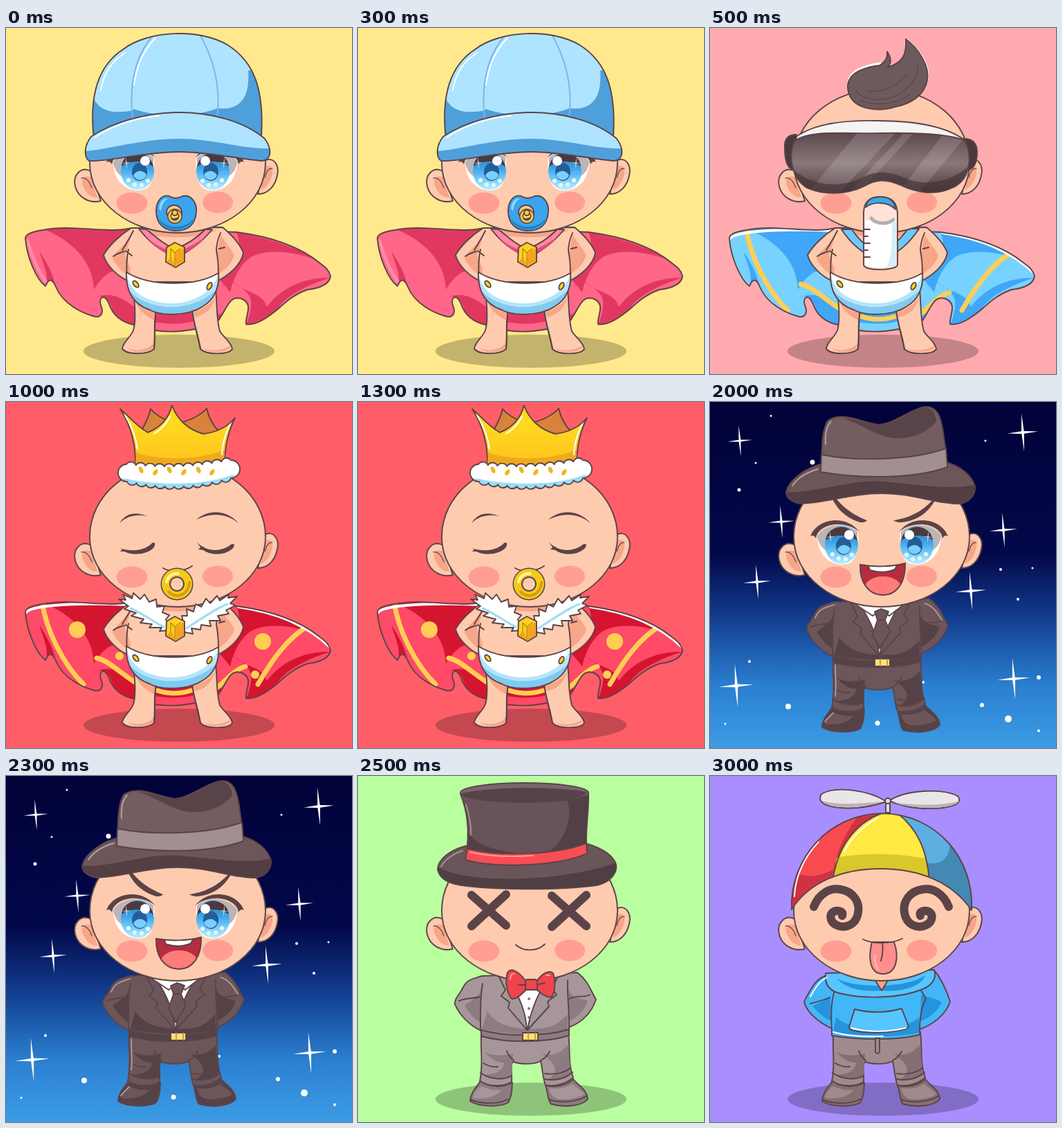
An HTML page for the animation above (3.5 s loop, 500 by 500 pixels).

```html
<!DOCTYPE html>
<html lang="en">
<head>
<meta charset="utf-8">
<title>Baby costumes</title>
<style>
html, body { margin: 0; width: 100%; height: 100%; overflow: hidden; }
svg { display: block; width: 100vw; height: 100vh; stroke-linejoin: round; stroke-linecap: round; }
</style>
</head>
<body>
<svg id="stage" viewBox="0 0 500 500"></svg>
<script>
const stage = document.getElementById("stage");
const ink = "#5b4348", skin = "#ffcbaf", shade = "#f7a688", white = "#fff", gold = "#ffd21f";
const cape = "var(--cape)", fold = "var(--fold)", suit = "var(--suit)", dim = "var(--dim)";
const hold = 500;
const scenes = [
  { bg: "#ffe98c", cape: "#ff6688", fold: "#e13861" },
  { bg: "#ffaaaf", cape: "#78d2ff", fold: "#40a6f7" },
  { bg: "#ff5e68", cape: "#ff4a68", fold: "#d5152f" },
  { bg: "#99e0ff", cape: "#ff4a68", fold: "#d5152f" },
  { bg: "#010238", suit: "#6d565a", dim: "#554247" },
  { bg: "#b9ff9f", suit: "#a6969a", dim: "#8c7b81" },
  { bg: "#a98eff", suit: "#a18a8c", dim: "#876e72" }
];

// Drawing helpers; each returns SVG markup.
const flat = (fill, d, more = "") => `<path fill="${fill}" d="${d}" ${more}/>`;
const line = (d, color = ink, w = 1.9) => flat("none", d, `stroke="${color}" stroke-width="${w}"`);
const shape = (fill, d) => flat(fill, d, `stroke="${ink}" stroke-width="1.9"`);
const oval = (fill, x, y, rx, ry = rx, more = "") => `<ellipse fill="${fill}" cx="${x}" cy="${y}" rx="${rx}" ry="${ry}" ${more}/>`;
const rim = `stroke="${ink}" stroke-width="1.9"`;
const ring = (x, y, r, color, w) => oval("none", x, y, r, r, `stroke="${color}" stroke-width="${w}"`);
const on = (list, ...kids) => `<g data-on="${list}">${kids.join("")}</g>`;
const place = (how, ...kids) => `<g transform="${how}">${kids.join("")}</g>`;
const pair = (sum, art) => art + place(`matrix(-1 0 0 1 ${sum} 0)`, art);
const fade = (id, ...stops) => `<linearGradient id="${id}" x2="0" y2="1">${stops.map(([o, c]) => `<stop offset="${o}" stop-color="${c}"/>`).join("")}</linearGradient>`;
let clips = 0;
function inside(fill, d, ...kids) {
  const id = "clip" + clips++;
  return `<clipPath id="${id}"><path d="${d}"/></clipPath>` + flat(fill, d) +
    `<g clip-path="url(#${id})">${kids.join("")}</g>` + shape("none", d);
}

function sparkle([x, y, r]) {
  const k = r * 0.08, h = r * 1.25;
  return place(`translate(${x} ${y}) rotate(-4)`, flat(white, `M0 ${-h}L${k} ${-k}L${r} 0L${k} ${k}L0 ${h}L${-k} ${k}L${-r} 0L${-k} ${-k}Z`));
}

function sky() {
  const big = [[43, 56, 18], [452, 44, 22], [103, 173, 19], [68, 260, 20], [424, 185, 20], [377, 273, 22], [38, 410, 25], [439, 400, 24]];
  const dots = [[148, 87, 3.5], [42, 127, 2.5], [431, 458, 5], [113, 440, 4], [242, 464, 3.5], [57, 375, 2], [308, 405, 2], [393, 438, 3], [420, 242, 2], [466, 240, 1.5], [475, 398, 3], [88, 20, 1.5], [398, 56, 1.5], [66, 88, 1.5], [445, 285, 2], [22, 465, 1.5], [475, 475, 2]];
  return big.map(sparkle).join("") + dots.map(s => oval(white, ...s)).join("");
}

// Round bumps along the top edge, then back along the bottom.
function furBand() {
  const n = 11, top = [], low = [];
  for (let i = 0; i <= n; i++) {
    const u = i / n, sag = Math.sin(Math.PI * u) * 6;
    top.push([174 + 151 * u, 90 - 6 * u + sag]);
    low.unshift([175 + 150 * u, 115 - 5 * u + sag * 1.6]);
  }
  const pts = [...top, ...low, top[0]];
  const spots = [196, 217, 237, 258, 279, 299].map((x, i) =>
    oval("#f5b61e", x, i % 2 ? 102 : 98, 3, 5, `transform="rotate(${i % 2 ? 35 : -25} ${x} 100)"`));
  return inside(white, "M" + pts[0] + pts.slice(1).map(p => "A8 8 0 0 1 " + p).join("") + "Z",
    line("M172 118C207 127 282 130 328 113", "#9adcf8", 15)) + spots.join("");
}

const eye = [
  flat(white, "M155 195C156 220 172 235 191 235C208 235 216 222 214 186C195 172 167 177 155 195Z"),
  flat("#b9b5b8", "M155 194C165 177 195 172 213 187V197C195 184 176 187 168 215C160 210 156 202 155 194Z"),
  oval("url(#iris)", 190, 207, 24, 27),
  flat("#4b393f", "M167 200C169 175 209 174 213 201C204 191 178 190 167 200Z"),
  oval("#255d96", 193, 208, 11, 13),
  flat("#7bd0ff", "M184 213C190 203 200 207 203 212C200 222 188 222 184 213Z"),
  oval(white, 201, 192, 7), sparkle([174, 195, 7]),
  oval("#e5fbff", 177, 220, 3), oval("#e5fbff", 186, 226, 3), oval("#e5fbff", 196, 227, 3), oval("#e5fbff", 205, 221, 3),
  flat(ink, "M145 194C155 167 198 162 216 188C203 176 177 172 161 184C155 189 154 192 153 197C151 193 148 192 145 194Z")
].join("");

const backdrop = [
  `<defs>${fade("night", [0, "#010238"], [.44, "#03084a"], [.62, "#123c8d"], [.82, "#2b7fd0"], [1, "#3c9ce6"])}
  ${fade("iris", [0, "#286fae"], [.45, "#3fa9ee"], [1, "#b9f0ff"])}
  ${fade("lens", [0, "#5c494c"], [.5, "#89777a"], [1, "#4c383c"])}
  ${fade("crown", [.3, "#ffd91f"], [1, "#ffc21d"])}</defs>`,
  flat("var(--bg)", "M0 0H500V500H0Z"),
  on("3",
    flat(white, "M0 38C12 40 14 22 38 22C62 22 76 36 74 57C95 48 118 60 118 84C135 84 150 92 158 103L200 130C140 143 60 148 0 142Z"),
    flat(white, "M500 8C478 10 467 24 464 27C445 20 430 32 425 53C405 48 366 44 359 70C355 84 364 90 374 92L310 100C370 108 440 104 500 101Z"),
    flat(white, "M30 232C55 224 78 225 92 219C78 202 92 188 113 193C128 150 210 150 240 170C320 130 385 130 412 168C425 180 420 196 417 203C438 203 448 218 446 231C466 231 482 245 481 260C492 261 497 264 500 268V284C380 270 150 230 30 232Z"),
    flat(white, "M0 332C8 318 26 312 42 318C90 280 165 290 200 310C280 275 345 290 380 322C430 300 475 300 500 303V392C430 410 390 402 345 414C220 424 90 428 0 421Z")),
  on("4", flat("url(#night)", "M0 0H500V500H0Z"), sky()),
  on("012356", oval("#000", 250, 467, 138, 24, 'opacity=".23"'))
];

const bareBody = on("0123",
  inside(cape, "M182 289C145 298 97 283 53 292C39 294 28 298 28 304C30 331 44 364 57 373C62 361 67 362 72 374C82 399 110 412 128 417C137 419 141 412 138 403C132 392 141 380 149 399C154 414 166 425 185 429C211 440 270 440 306 424C320 405 322 386 340 391C359 399 345 416 347 428C362 430 377 419 392 407C404 396 416 385 436 378C453 376 467 371 469 359C467 350 462 346 454 340C420 312 372 300 333 295Z",
    flat(fold, "M58 292C97 285 130 298 180 290L184 362C165 345 147 345 127 378C126 344 105 313 58 292ZM48 322C56 348 61 353 58 374H72C67 352 58 338 48 322ZM126 391C145 381 153 398 156 418L190 440H300L312 412C290 424 205 420 184 402C165 388 147 380 126 391Z"),
    flat(fold, "M306 360C329 347 345 327 333 295C380 304 426 319 446 334C405 320 373 321 354 331C338 342 328 362 324 382ZM324 364C350 382 364 386 347 430C375 424 385 413 393 405C402 391 425 375 468 361C430 360 397 376 377 403C370 381 348 385 324 364Z"),
    on("123",
      line("M52 288C58 330 82 378 112 408M131 370C149 374 164 391 188 406M212 417C230 421 252 421 270 417M299 417C318 406 324 389 346 382M364 408C383 375 408 338 440 322", "#ffce55", 7),
      line("M29 304C35 296 80 289 180 293M336 296C400 305 440 327 468 354", white, 4)),
    on("23", ...[[103, 329, 12], [371, 346, 12], [164, 367, 6], [360, 394, 6]].map(c => oval("#ffce55", ...c))),
    on("0", line("M31 308C40 336 46 350 57 366", "#ff8ba7", 5))),
  shape(skin, "M184 380C187 405 188 424 184 437C180 447 169 454 168 463C172 472 203 473 214 464C216 444 213 427 217 406L269 406C270 424 276 440 281 464C289 472 321 473 327 464C326 454 314 447 309 438C304 422 305 397 303 378Z"),
  flat(cape, "M218 411H268L273 434C250 440 234 440 215 436Z"),
  flat(fold, "M218 411H268L271 424C250 429 233 428 216 425Z"),
  on("123", line("M219 417C234 422 252 422 267 417", "#ffce55", 7)),
  line("M217 408C214 425 216 444 214 464M269 408C270 424 278 443 281 464M215 437C235 440 253 439 274 435"),
  flat(shade, "M186 391C195 402 204 407 215 408L214 422C201 416 190 407 186 391ZM271 408C285 406 296 399 302 389C299 406 286 416 272 418ZM176 463C190 468 204 465 213 456V463C202 470 183 470 176 463ZM284 463C299 468 313 466 324 459C326 468 297 472 284 463Z"),
  shape(skin, "M181 289C165 299 149 314 141 328C144 342 161 360 180 367H303C323 357 340 342 343 325C338 311 326 299 313 288Z"),
  flat(shade, "M181 301C170 314 158 324 154 334C162 347 171 355 179 359L180 347L172 328ZM311 298C315 310 327 319 330 329C324 344 315 350 307 356L305 323ZM191 292H305C282 306 210 306 191 292Z"),
  line("M184 293C178 305 173 313 168 321M177 320C174 333 174 348 175 360M173 322L182 329M310 296C307 303 304 311 304 322C307 335 307 347 307 358M308 319L316 317M155 330C160 326 166 324 171 323"),
  inside(white, "M174 353C208 374 275 374 307 354C309 376 300 394 283 403C263 416 225 417 207 407C184 399 173 380 174 353Z",
    flat("#b4e5fb", "M175 358C181 386 211 398 240 398C269 398 297 383 306 358L310 420H172Z"),
    flat("#82caf0", "M178 380C210 411 267 411 302 380L300 420H180Z")),
  oval(gold, 187.5, 370, 3, 5.5, rim + ' transform="rotate(-40 187.5 370)"'),
  oval(gold, 294, 373, 3, 5.5, rim + ' transform="rotate(28 294 373)"'));

const neckwear = [
  on("0",
    shape("#ff86a2", "M192 290L203 291C218 303 230 314 245 319C262 313 276 303 288 291H298C285 307 269 321 246 332C222 321 206 309 192 290Z"),
    flat("#e34d76", "M201 301C217 315 229 320 244 322V330C222 322 211 312 201 301ZM288 302C277 315 264 323 249 329V323C264 317 277 310 288 302Z")),
  on("1", shape("#6dcaff", "M190 291H205C217 309 231 320 245 323C263 317 276 305 286 290H302C289 310 271 327 246 336C220 327 203 311 190 291Z"))
];

const dressed = [
  on("456",
    shape(suit, "M178 372C177 398 181 419 176 441C190 450 211 449 222 442C223 428 219 418 224 413C236 417 254 417 264 412C267 425 267 437 271 447C285 449 300 445 311 436C303 415 307 393 304 370Z"),
    flat(dim, "M183 398C197 407 214 403 224 401L222 435C212 440 196 440 180 432C202 432 211 423 211 414C201 415 190 408 183 398ZM266 402C285 405 294 399 303 389L308 431C299 439 286 441 272 440C290 430 290 418 266 402Z"),
    line("M177 429C192 439 210 440 222 433M181 415C190 420 197 421 202 420M270 438C286 441 300 437 310 428M270 430C285 432 298 429 307 422M225 411C219 406 216 401 215 397M264 411C272 407 275 402 277 398"),
    shape(dim, "M177 441C170 451 162 459 162 470C174 478 205 479 217 472C224 460 222 451 223 443C208 451 190 450 177 441Z"),
    shape(dim, "M271 447C275 459 274 469 279 474C296 479 323 478 332 467C331 453 318 447 311 438C303 446 286 451 271 447Z"),
    flat(suit, "M178 448C170 454 167 460 166 465C183 468 198 464 207 454C198 454 187 453 178 448ZM276 451C278 460 282 465 290 467C308 468 321 464 327 460C322 453 315 450 309 445C300 451 288 453 276 451Z"),
    line("M163 468C178 474 202 475 217 467M277 468C293 473 318 471 331 462")),
  on("45",
    shape(suit, "M179 289C164 294 158 293 151 307C147 316 139 321 140 330C147 345 160 360 178 368V376C215 385 270 384 305 374V363C324 356 337 343 344 323C337 312 333 296 317 284Z"),
    flat(dim, "M178 307C176 320 161 325 154 332C162 345 169 351 178 357ZM304 308C309 322 326 322 332 325C326 341 317 348 305 354ZM187 340C201 362 228 367 264 365C281 364 292 356 303 344V366C270 375 219 375 179 366Z"),
    line("M180 300C176 322 177 348 177 368M303 295C302 319 306 345 305 365M146 325C158 320 167 322 176 319M305 322C317 316 326 321 335 316"),
    shape(white, "M208 287H286L245 366Z"),
    shape(suit, "M203 289L213 309L207 318L219 327L217 335L244 367C243 341 231 314 216 292Z"),
    shape(suit, "M290 288L280 307L287 316L274 326L276 333L245 367C249 341 260 314 276 290Z"),
    shape(dim, "M178 367C213 377 270 377 305 366V375C270 386 215 386 178 376Z"),
    shape("#ffe07a", "M238 371H260V382H238Z"), line("M246 372V381M256 372V381", "#c99b38")),
  on("4",
    shape(white, "M208 291L235 309L247 300L259 309L286 288Z"),
    shape(suit, "M238 303L247 299L258 303L253 315H242ZM242 315L235 336L245 356L260 332L253 315Z"),
    line("M180 293C161 298 156 302 152 312M310 291C322 294 329 305 335 315M181 380C181 395 183 410 181 425M166 462C170 456 175 453 178 449", "#b5a1a3", 1.6)),
  on("6",
    shape("#42b7f8", "M166 289C152 294 145 309 136 326C139 341 157 356 176 365V375C215 382 270 382 303 374V366C321 360 341 345 347 326C342 310 333 291 324 281Z"),
    flat("#2693df", "M174 318C163 326 155 328 149 333C159 345 166 350 175 354ZM305 316C317 321 328 321 335 327C326 344 316 349 304 355ZM182 349C213 372 270 373 302 349V371C270 378 216 378 178 371Z"),
    line("M180 310C174 330 175 350 176 367M304 308L312 322C305 334 303 350 303 368M145 329C156 326 164 324 173 320"),
    shape("#57c5ff", "M167 285C165 302 173 312 192 315C227 323 276 320 302 310C321 304 328 293 324 280Z"),
    flat("#2693df", "M184 293C210 307 285 307 311 288C306 305 274 313 247 310C221 313 194 306 184 293Z"),
    shape(shade, "M238 294L248 310L258 294Z"),
    shape("#57c5ff", "M209 337C232 343 256 342 277 336L287 362C285 366 279 367 272 368C250 372 228 372 207 368C201 366 200 363 202 359Z"),
    line("M204 364C228 371 260 370 283 364M169 291C157 297 151 308 145 319M178 370C200 376 225 377 250 376", white),
    shape(suit, "M239 379V399Q242 403 245 399V379Z"))
];

const head = [
  shape(skin, "M123 207C108 199 96 213 100 229C104 244 119 254 137 250ZM374 192C385 185 396 197 392 213C389 228 379 240 364 240Z"),
  flat(shade, "M123 216C112 211 107 220 112 230C117 241 124 245 132 245ZM374 201C382 195 388 204 384 214C381 224 376 231 368 234Z"),
  line("M109 217C115 215 121 222 124 231M385 203C379 202 376 208 374 216", ink, 1.2),
  shape(skin, "M121 195C121 135 177 88 248 88C319 88 375 135 375 195C375 252 317 296 248 296C179 296 121 252 121 195Z"),
  oval("#ff9f94", 182, 253, 22.5, 15.5), oval("#ff9f94", 306, 252, 22, 15.5)
];

const cross = line("M-25-22L25 22M25-23L-25 23", ink, 12);
const mouth = "M217 235C237 239 264 238 282 233C283 262 269 279 250 279C230 279 216 262 217 235Z";
const face = [
  on("034", pair(489, eye)),
  on("34", flat(ink, "M170 120C183 145 199 160 227 171C224 174 221 174 217 174C191 166 176 147 170 120ZM265 171C293 167 311 155 329 134C318 160 299 172 276 174C271 174 268 173 265 171Z")),
  on("2",
    flat(ink, "M164 175C173 160 188 158 204 165C188 162 176 164 164 175ZM275 170C293 154 320 156 336 175C319 161 297 159 275 170Z"),
    flat(ink, "M162 210C177 217 200 216 211 204C215 201 217 206 213 211C204 221 181 222 171 216H165L168 213ZM276 203C290 216 309 218 325 206C330 203 332 208 327 212C315 223 294 221 285 214L278 213L281 210Z")),
  on("5", place("translate(189 194)", cross), place("translate(305 195)", cross), line("M228 244C239 254 259 254 270 243")),
  on("6",
    pair(495, line("M150 189C158 169 174 161 189 164C207 167 217 182 214 198C211 215 196 221 184 216C172 211 171 197 182 195C188 194 193 197 191 202", ink, 12)),
    shape("#ff8e8d", "M234 240C228 264 231 286 250 286C269 286 274 263 266 240Z"),
    flat("#ffb0a8", "M237 258C235 271 239 280 246 282C241 275 239 268 240 257Z"),
    line("M249 241C251 252 249 260 247 267M221 236C235 243 262 243 278 235")),
  on("4", inside("#b52d3e", mouth, oval("#ff7d79", 250, 270, 27, 18), shape(white, "M228 234H271L267 242C255 247 241 246 231 243Z"))),
  on("0",
    shape("#39a5ef", "M217 264C217 250 226 240 236 243C242 247 249 246 255 243C266 240 276 251 275 265C274 285 262 293 246 293C228 293 217 283 217 264Z"),
    flat("#8bd5ff", "M221 261C222 250 228 245 234 247C228 250 225 255 224 265Z"),
    flat("#1f7fc9", "M221 276C233 291 259 291 272 275C266 295 228 297 221 276Z"),
    oval("#ffcf8a", 243, 266, 11, 10, rim), ring(244, 272, 8, ink, 6), ring(244, 272, 8, "#ffc93b", 3), oval(gold, 244, 267, 4, 4, rim)),
  on("23",
    line("M227 240C239 247 255 246 269 237"),
    ring(247, 263, 16.5, ink, 14), ring(247, 263, 16, "#f4c91c", 12),
    line("M232 260C234 251 242 247 249 248", "#fff3a0", 4), line("M235 274C244 285 264 280 265 261", "#d99a18", 4),
    oval(skin, 247, 263, 10, 10, rim),
    shape(white, "M236 330L222 331L225 326L207 326L211 321L194 319L199 314L181 309L188 305L171 299L177 295L163 285L173 286L169 278L182 284L184 276L194 285L200 278L207 289L217 285L218 296L229 295L226 304L236 308L231 314Z"),
    shape(white, "M255 332L257 321L254 309H262L261 299L271 303L274 292L282 296L289 284L295 291L305 280L309 287L322 278L321 283L334 281L324 291L331 294L318 301L322 306L306 309L310 316L294 316L296 324L282 322L281 329L268 327L270 335Z"),
    line("M180 298C195 304 208 315 228 325M320 292C302 299 282 313 261 327", "#9edcf7", 3)),
  on("023",
    shape(gold, "M232 317L244 310L258 317V338L245 346L231 338Z"),
    flat("#f3a51d", "M245 326L257 318V337L245 345ZM232 337L239 331L245 345Z"),
    line("M238 319L244 325L252 319M244 325V344M238 319V333", "#b9781c", 1.2))
];

const seams = "M248 54C207 69 184 106 177 151M270 53C301 77 314 109 317 152";
const lens = "M122 163C145 147 193 153 246 152C301 151 347 153 369 163C380 190 375 220 350 231C323 244 294 236 275 227C255 218 240 218 222 229C198 241 164 242 140 231C119 218 112 187 122 163Z";
const hats = [
  on("0",
    inside("#aee4ff", "M127 160C120 100 132 55 169 31C205 3 281 0 321 25C360 50 373 91 369 156Z",
      flat("#4f9fdb", "M126 100C134 119 151 125 184 119L183 132L125 165ZM184 117C220 129 270 130 306 116L310 132H180ZM306 116C337 120 353 102 350 61L375 65V160L304 134Z"),
      line("M213 10C185 42 178 85 183 130M280 9C299 43 311 84 305 130", "#75b9e6"),
      line("M137 90C141 65 154 47 172 36M216 14C198 33 188 58 185 82", white)),
    inside("#aee4ff", "M123 157C113 170 112 186 120 192C144 194 202 179 250 179C295 179 339 190 370 192C385 190 384 174 374 160C343 134 293 121 245 122C199 123 153 137 123 157Z",
      flat("#4f9fdb", "M112 178C141 177 198 160 249 160C301 160 344 176 385 174V195H112Z")),
    line("M128 158C154 141 189 129 221 127", white)),
  on("1",
    line("M201 87C197 62 226 55 246 52M284 18C303 34 317 55 313 74", white, 5),
    shape("#6c5a5d", "M202 98C192 74 207 59 245 54C254 49 257 43 256 34C262 43 262 51 257 57C276 50 285 41 283 16C302 30 318 56 314 75C310 98 289 110 267 114C242 122 211 117 202 98Z"),
    line("M211 91C226 108 260 107 280 91C295 80 301 66 300 51M229 91C249 94 273 83 285 66M218 105C239 114 271 109 288 97", ink, 1.2),
    shape("#f5f3f3", "M121 160C146 139 190 133 239 134C298 134 344 143 369 163L350 174H140Z"),
    shape("#493a3e", "M125 154C113 154 107 160 108 174C108 190 111 204 122 205ZM367 160C380 160 386 167 386 180C386 194 382 204 371 206Z"),
    inside("url(#lens)", lens,
      flat(white, "M214 150H270L185 240H140ZM282 150H296L213 240H199ZM340 150H375L300 240H270Z", 'opacity=".14"'),
      flat("#433337", "M115 200C145 230 190 232 220 216C240 206 258 207 280 216C313 231 352 222 378 196V245H115Z", 'opacity=".65"')),
    shape("#ffe3d7", "M222 268C222 250 231 244 246 244C262 244 271 252 271 270V342C271 351 222 352 222 342Z"),
    shape("#3ba8e9", "M225 259C226 248 235 244 246 244C258 244 267 249 268 262C257 251 237 250 225 259Z"),
    flat(white, "M224 278C232 275 237 282 246 281C255 281 260 275 269 278V341C267 347 226 348 224 342Z"),
    line("M233 275C240 284 257 284 265 277", "#b8adb0", 5),
    flat("#d7edf8", "M263 280H269V342C265 345 259 346 255 346C264 330 263 305 263 280Z"),
    line("M223 291H231M223 301H228M223 311H231M223 321H228M223 331H231")),
  on("23",
    shape("#d9823b", "M194 45C201 31 207 22 209 10C217 20 228 25 238 28L233 52ZM253 30C269 25 282 19 290 9C293 24 300 35 309 44L264 54Z"),
    shape("url(#crown)", "M165 10C179 22 190 36 205 44C223 37 235 23 240 5C247 25 263 40 285 46C304 44 320 36 331 23C319 46 317 66 315 92H187C188 62 181 35 165 10Z"),
    flat("#f0a91d", "M188 73C220 85 281 84 316 69L315 91H187Z"),
    line("M172 19C181 34 188 51 190 68M237 21C231 33 222 41 214 46M324 32C315 50 313 62 312 76", white),
    furBand()),
  on("4",
    inside(suit, "M163 89C140 94 113 113 110 130C110 139 120 146 132 147C172 145 204 132 249 132C294 132 325 147 360 147C376 146 384 132 383 122C378 105 362 93 341 87Z",
      flat("#523e43", "M108 130C155 132 204 111 251 115C300 119 342 128 386 119V150H108Z")),
    shape("#735d60", "M160 101C163 77 159 46 170 27C191 12 219 30 244 33C267 30 287 13 306 8C329 2 334 24 337 43C339 62 343 77 343 94C290 113 211 110 160 101Z"),
    shape("#a28f92", "M161 76C209 86 291 85 341 67L343 94C291 113 210 110 160 101Z"),
    flat("#584448", "M245 33C270 31 289 13 307 8C321 7 326 16 327 28C309 51 270 60 241 45C225 39 211 29 190 23C216 25 230 33 245 33Z"),
    line("M119 121C127 109 142 101 156 97M167 61C166 44 170 33 175 28", "#b5a1a3")),
  on("5",
    inside("#6a565a", "M156 101C134 107 116 119 115 135C118 150 135 157 157 159C210 165 290 165 345 158C364 154 375 141 373 128C368 113 351 104 331 98Z",
      flat("#4f3e43", "M113 130C155 158 301 153 376 124V170H113Z")),
    shape("#685458", "M148 26C158 51 162 77 156 120C198 134 290 130 331 112C327 84 334 56 333 24Z"),
    flat("#514047", "M302 33C312 65 297 92 277 109C300 108 319 103 330 97C328 73 333 48 333 29ZM158 80C171 102 202 107 231 112C203 114 179 110 159 106Z"),
    shape("#f84d55", "M158 105C206 117 287 114 330 97L331 112C290 130 198 134 155 121Z"),
    line("M162 110C193 117 226 117 253 115", "#ff9a96"),
    oval("#79656a", 240.5, 24, 92.5, 14, rim),
    flat("#56434a", "M151 25C191 15 290 15 330 23C330 42 150 43 151 25Z"),
    line("M120 131C125 121 138 112 151 108M156 41C161 57 164 70 163 85", "#a39397"),
    shape("#f0444c", "M243 297C233 283 222 276 216 284C212 298 216 315 222 322C229 323 237 315 245 307ZM258 297C266 285 276 280 282 285C286 297 285 314 279 320C271 320 265 314 256 307Z"),
    shape("#f0444c", "M245 294H256Q259 294 259 298V309H242V298Q242 294 245 294Z"),
    line("M232 302H241M261 301L270 299"), line("M220 294C220 288 222 285 226 286M272 288H277", "#ff9d9a"),
    ...[322, 336, 349].map(y => oval("#80747a", 247, y, 2))),
  on("6",
    inside("#f94a4f", "M118 193C115 119 172 55 249 54C327 55 382 119 378 194C350 153 302 134 246 134C192 134 143 153 118 193Z",
      flat("#ce3243", "M112 135C136 145 145 150 177 136L185 154L112 200ZM212 60C194 86 181 112 176 150L200 130L248 54Z"),
      flat("#ffe943", "M248 54C207 69 184 106 177 151H317C314 109 301 77 271 54Z"),
      flat("#d8c82c", "M183 118C217 111 276 111 314 120L318 150H177Z"),
      flat("#5daee1", "M270 53C301 77 314 109 317 152L390 207V90Z"),
      flat("#4389b3", "M314 125C338 132 355 109 342 80L390 100V210L317 154Z"),
      line(seams), line("M122 174C123 145 137 116 157 95M243 60C218 75 202 92 194 109", white)),
    shape("#e9e6e8", "M255 37C229 20 181 14 161 26C151 43 183 48 213 46C231 44 246 40 255 37ZM259 36C281 20 335 17 358 29C369 43 338 48 309 47C288 46 271 41 259 36Z"),
    flat("#bab4b9", "M162 36C185 43 219 39 251 37C228 45 174 51 162 36ZM265 38C293 42 334 44 360 36C354 49 291 49 265 38Z"),
    shape("#ddd", "M254 37H260V53H254Z"), oval("#ddd", 257, 36, 4, 4, rim))
];

stage.innerHTML = [backdrop, bareBody, neckwear, dressed, head, face, hats].flat().join("");
const parts = stage.querySelectorAll("[data-on]");

let current = -1;
function draw(time) {
  const i = Math.floor(time / hold) % scenes.length;
  if (i === current) return;
  current = i;
  for (const [key, color] of Object.entries(scenes[i])) stage.style.setProperty("--" + key, color);
  for (const p of parts) p.style.display = p.dataset.on.includes(i) ? "" : "none";
}

const start = performance.now();
function tick() {
  draw(performance.now() - start);
  requestAnimationFrame(tick);
}
tick();
</script>
</body>
</html>
```
